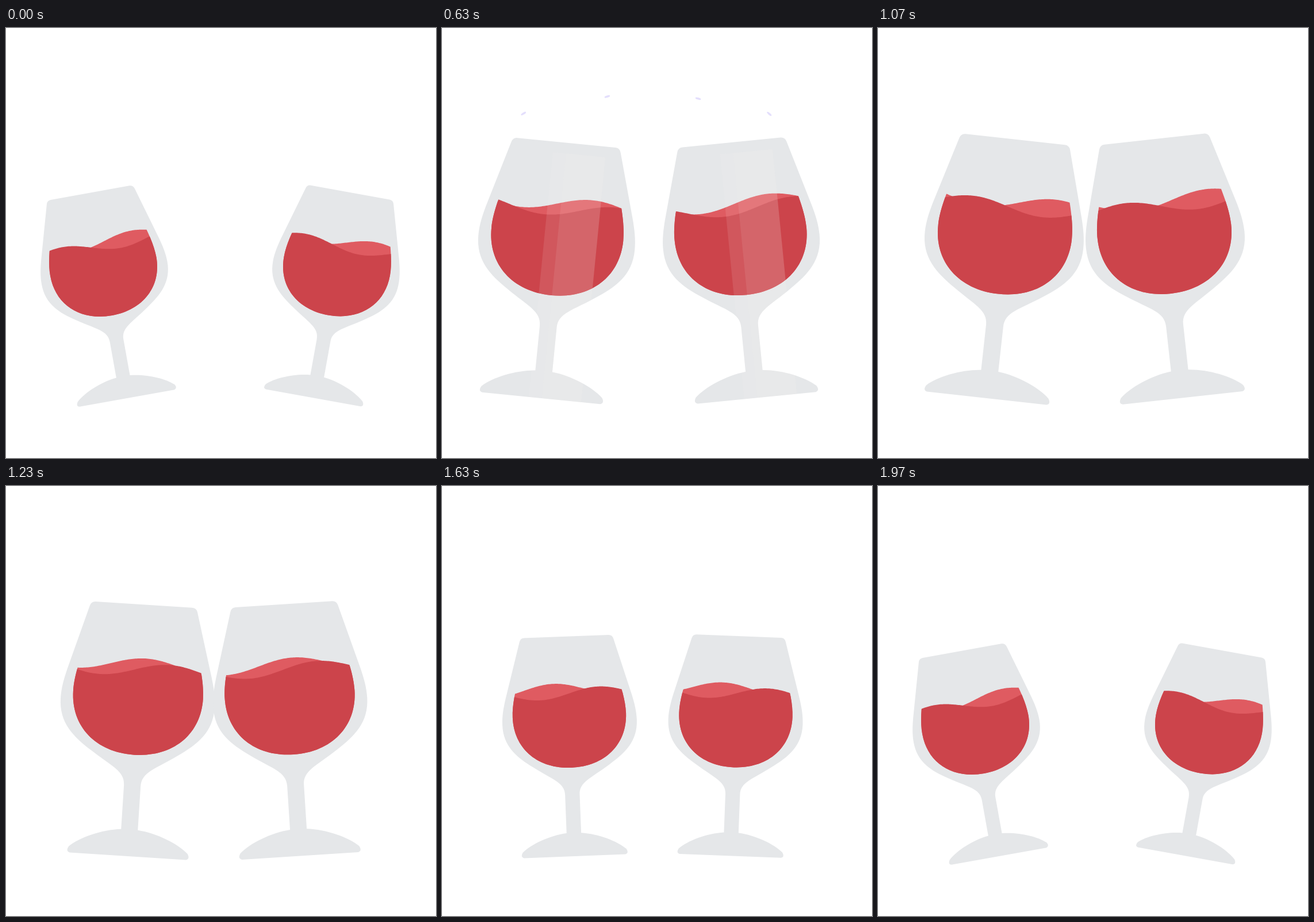
An HTML page with a canvas for the animation above (2010 ms loop, 748 by 748 pixels).

```html
<!DOCTYPE html>
<html lang="en">
<head>
<meta charset="utf-8">
<title>Cheers</title>
<style>
  html, body { margin: 0; width: 100%; height: 100%; overflow: hidden; background: #fff; }
  canvas { display: block; width: 100vmin; height: 100vmin; }
</style>
</head>
<body>
<canvas id="stage"></canvas>
<script>
const SIZE = 748, LOOP = 2010;
const canvas = document.getElementById('stage');
const ctx = canvas.getContext('2d');
const dpr = window.devicePixelRatio || 1;
canvas.width = canvas.height = SIZE * dpr;

const GLASS = '#e5e7e9', WINE = '#cc444b', BACK = '#df5b61';
const WAVELENGTH = 222, SWING = 10.8;

// Smooth monotone curve through [time, value] keys, held at both ends
function track(...keys) {
  const last = keys.length - 1;
  const slope = i => (keys[i + 1][1] - keys[i][1]) / (keys[i + 1][0] - keys[i][0]);
  const tangent = keys.map((k, i) => {
    if (i === 0 || i === last) return 0;
    const a = slope(i - 1), b = slope(i);
    return a * b > 0 ? 2 * a * b / (a + b) : 0;
  });
  return t => {
    if (t <= keys[0][0]) return keys[0][1];
    if (t >= keys[last][0]) return keys[last][1];
    let i = 0;
    while (t >= keys[i + 1][0]) i++;
    const [t0, v0] = keys[i], [t1, v1] = keys[i + 1];
    const d = t1 - t0, u = (t - t0) / d, w = 1 - u;
    return v0 * (1 + 2 * u) * w * w + v1 * u * u * (3 - 2 * u)
      + d * u * w * (tangent[i] * w - tangent[i + 1] * u);
  };
}

const tilt = track([0, -10.2], [370, -7.9], [530, -4], [570, 0], [630, 5.6],
  [760, 9.5], [1070, 6.3], [1430, 0.25], [1630, -2.2], [1970, -10.2]);
const scale = track([0, 0.892], [370, 0.922], [530, 0.98], [570, 1.04], [630, 1.097],
  [760, 1.113], [1070, 1.113], [1430, 1], [1630, 0.94], [1970, 0.892]);
const leftX = track([0, 210.5], [370, 205], [530, 197], [570, 181], [630, 172.5],
  [760, 173], [1070, 189], [1430, 234.5], [1630, 231], [1970, 210.5]);
const rightX = track([0, 534.5], [370, 537], [530, 541], [570, 545], [630, 547.5],
  [760, 547], [1070, 530], [1430, 494.5], [1630, 501.5], [1970, 534.5]);
const frontCrest = track([0, -72], [370, 128], [450, 142], [630, 87], [1005, -72],
  [1070, -56], [1430, 149], [1630, 57], [1970, -72]);
const backCrest = track([0, 66], [370, -94], [630, 50], [1005, 74],
  [1070, 73], [1430, -76], [1630, -27], [1970, 66]);
const shineLevel = track([290, 0], [370, 0.35], [520, 1], [650, 1], [860, 0]);

// Shapes stand on the origin, y up is negative
const glassShape = new Path2D(`M-78-407 L78-407 Q85-407 87-400 L117-295
  C121-280 124.5-265 124.5-248 C124.5-208 100-187 70-167
  C35-143 13.5-137 13.5-114 L13.5-43 C45-40 80-25 96-10 Q101-2 94 0
  L-94 0 Q-101-2 -96-10 C-80-25 -45-40 -13.5-43 L-13.5-114
  C-13.5-137 -35-143 -70-167 C-100-187 -124.5-208 -124.5-248
  C-124.5-265 -121-280 -117-295 L-87-400 Q-85-407 -78-407 Z`);
const bowlShape = new Path2D(`M-88-345 L88-345 C98-310 105-285 105-261
  C105-203 62-164 0-164 C-62-164 -105-203 -105-261 C-105-285 -98-310 -88-345 Z`);

function wave(level, crest, color) {
  ctx.beginPath();
  ctx.moveTo(-110, -150);
  for (let x = -110; x <= 110; x += 2) {
    ctx.lineTo(x, level - SWING * Math.cos((x - crest) / WAVELENGTH * 2 * Math.PI));
  }
  ctx.lineTo(110, -150);
  ctx.fillStyle = color;
  ctx.fill();
}

function shine(t) {
  const k = shineLevel(t);
  if (k <= 0) return;
  const edge = -17 + 0.31 * (t - 370);
  ctx.save();
  ctx.clip(glassShape);
  const strip = (width, alpha) => {
    ctx.fillStyle = `rgba(240,236,230,${alpha * k})`;
    ctx.fillRect(edge - width, -390, width, 390);
  };
  strip(84, 0.11);
  strip(63, 0.09);
  ctx.restore();
}

function glass(t, x, y, degrees) {
  ctx.save();
  ctx.translate(x, y);
  ctx.rotate(degrees * Math.PI / 180);
  const s = scale(t);
  ctx.scale(s, s);
  ctx.fillStyle = GLASS;
  ctx.fill(glassShape);
  ctx.save();
  ctx.clip(bowlShape);
  wave(-309.5, backCrest(t), BACK);
  wave(-301.5, frontCrest(t), WINE);
  ctx.restore();
  shine(t);
  ctx.restore();
}

// x, y, angle, drift x, drift y
const sparks = [
  [142, 149, -32, -60, -45], [287.5, 119.5, -18, -22, -60],
  [445.5, 123, 16, 22, -62], [569, 149.5, 40, 70, -45]
];
const sparkSize = track([595, 0], [630, 1], [720, 1.4], [880, 0]);
const sparkMove = track([595, -0.12], [630, 0], [880, 1]);

function drawSparks(t) {
  const size = sparkSize(t), move = sparkMove(t);
  if (size <= 0) return;
  ctx.fillStyle = '#e4dffc';
  for (const [x, y, angle, dx, dy] of sparks) {
    ctx.beginPath();
    ctx.ellipse(x + dx * move, y + dy * move, 5 * size, 1.8 * size,
      angle * Math.PI / 180, 0, 2 * Math.PI);
    ctx.fill();
  }
}

function draw(t) {
  ctx.setTransform(dpr, 0, 0, dpr, 0, 0);
  ctx.fillStyle = '#fff';
  ctx.fillRect(0, 0, SIZE, SIZE);
  const a = tilt(t);
  glass(t, leftX(t), 644, a);
  glass(t, rightX(t), 643.4, -a);
  drawSparks(t);
}

const start = performance.now();
function tick() {
  draw((performance.now() - start) % LOOP);
  requestAnimationFrame(tick);
}
tick();
</script>
</body>
</html>
```
